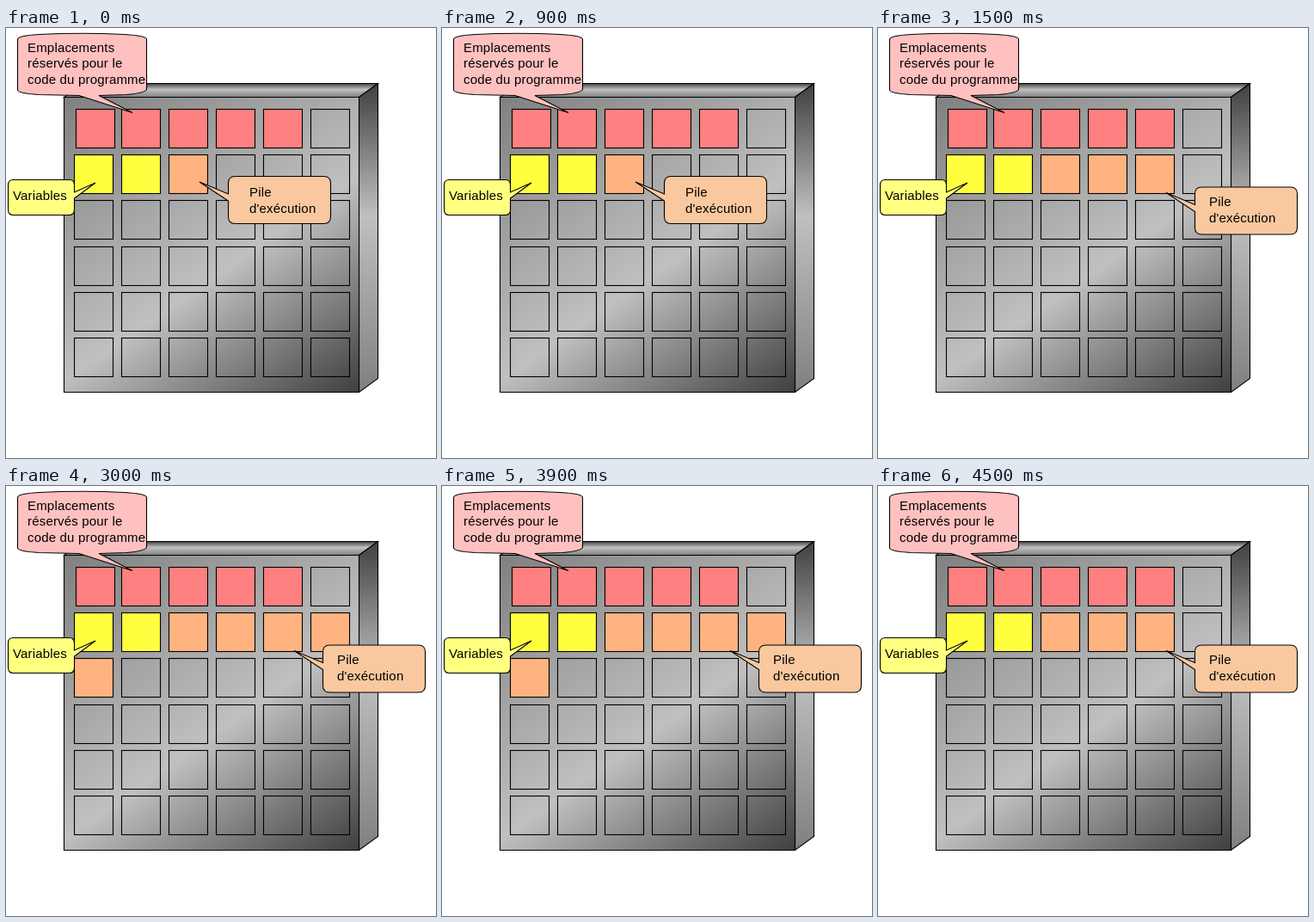
These frames come from a looping animation (500 by 500 pixels, 6000 ms). An HTML page:

```html
<!DOCTYPE html>
<html lang="fr">
<head>
<meta charset="utf-8">
<title>Pile d'exécution</title>
<style>
  html, body { margin: 0; width: 100%; height: 100%; overflow: hidden; background: #fff; }
  svg { display: block; width: 500px; height: 500px; }
  path, rect { stroke: #000; stroke-width: 1.1; }
  text { font: 15px "Liberation Sans", Arial, sans-serif; letter-spacing: .18px; }
</style>
</head>
<body>
<svg viewBox="0 0 500 500">
  <defs>
    <linearGradient id="front" gradientUnits="userSpaceOnUse" x1="67" y1="80" x2="340" y2="471">
      <stop offset="0" stop-color="#808080"/>
      <stop offset=".57" stop-color="#c0c0c0"/>
      <stop offset="1" stop-color="#404040"/>
    </linearGradient>
    <linearGradient id="side" x1="0" y1="0" x2="0" y2="1">
      <stop offset="0" stop-color="#404040"/>
      <stop offset=".43" stop-color="#c0c0c0"/>
      <stop offset="1" stop-color="#808080"/>
    </linearGradient>
  </defs>

  <path fill="url(#side)" d="M67.5 80.5 89.5 64.5H432.5L410.5 80.5Z"/>
  <path fill="url(#side)" d="M410.5 80.5 432.5 64.5V407.5L410.5 423.5Z"/>
  <path fill="url(#front)" d="M67.5 80.5H410.5V423.5H67.5Z"/>
  <g id="cells"></g>

  <path fill="#ffc0c0" d="M13.5 13Q14 9 38 7.5Q88 5 138 7.5Q163 9 163.5 13V71Q163 75.500 140 77.500L108 78.500 147 98.500 85 78.500 38 77.500Q14 76 13.500 72Z"/>
  <text x="25" y="28">Emplacements</text>
  <text x="25" y="46">réservés pour le</text>
  <text x="25" y="65">code du programme</text>

  <path fill="#ffff80" d="M8.500 176.500H73.500Q79.500 176.500 79.500 182.500V191L104 180 79.500 198V211.500Q79.500 217.500 73.500 217.500H8.500Q2.500 217.500 2.500 211.500V182.500Q2.500 176.500 8.500 176.500Z"/>
  <text x="8" y="200">Variables</text>

  <path id="bubble" fill="#fac89e" d="M266.500 172.500H369.500Q377.500 172.500 377.500 180.500V219.500Q377.500 227.500 369.500 227.500H266.500Q258.500 227.500 258.500 219.500V201L225 179 258.500 193V180.500Q258.500 172.500 266.500 172.500Z"/>
  <g id="label">
    <text x="283" y="196">Pile</text>
    <text x="283" y="215">d'exécution</text>
  </g>
</svg>
<script>
  const byId = id => document.getElementById(id);
  const columns = [79.5, 134.5, 189.5, 244.5, 299.5, 354.5];
  const rows = [94.5, 147.5, 200.5, 254.5, 307.5, 360.5];
  const stackSizes = [1, 3, 5, 3];
  const stackStart = 8;

  const cells = rows.flatMap((y, row) => columns.map((x, col) => {
    const cell = document.createElementNS("http://www.w3.org/2000/svg", "rect");
    const shift = row === 0 && col === 0 ? 2 : 0;
    const box = { x: x + shift, y, width: 45, height: 45 };
    for (const key in box) cell.setAttribute(key, box[key]);
    return byId("cells").appendChild(cell);
  }));

  function color(i, stackSize) {
    if (i < 5) return "#ff8080";
    if (i === 6 || i === 7) return "#ffff40";
    return i >= stackStart && i < stackStart + stackSize ? "#ffb380" : "none";
  }

  function draw() {
    const step = Math.floor(performance.now() % 6000 / 1500);
    cells.forEach((cell, i) => cell.setAttribute("fill", color(i, stackSizes[step])));
    byId("bubble").setAttribute("transform", step ? "translate(110 12.5)" : "");
    byId("label").setAttribute("transform", step ? "translate(102 11)" : "");
    requestAnimationFrame(draw);
  }
  draw();
</script>
</body>
</html>
```
